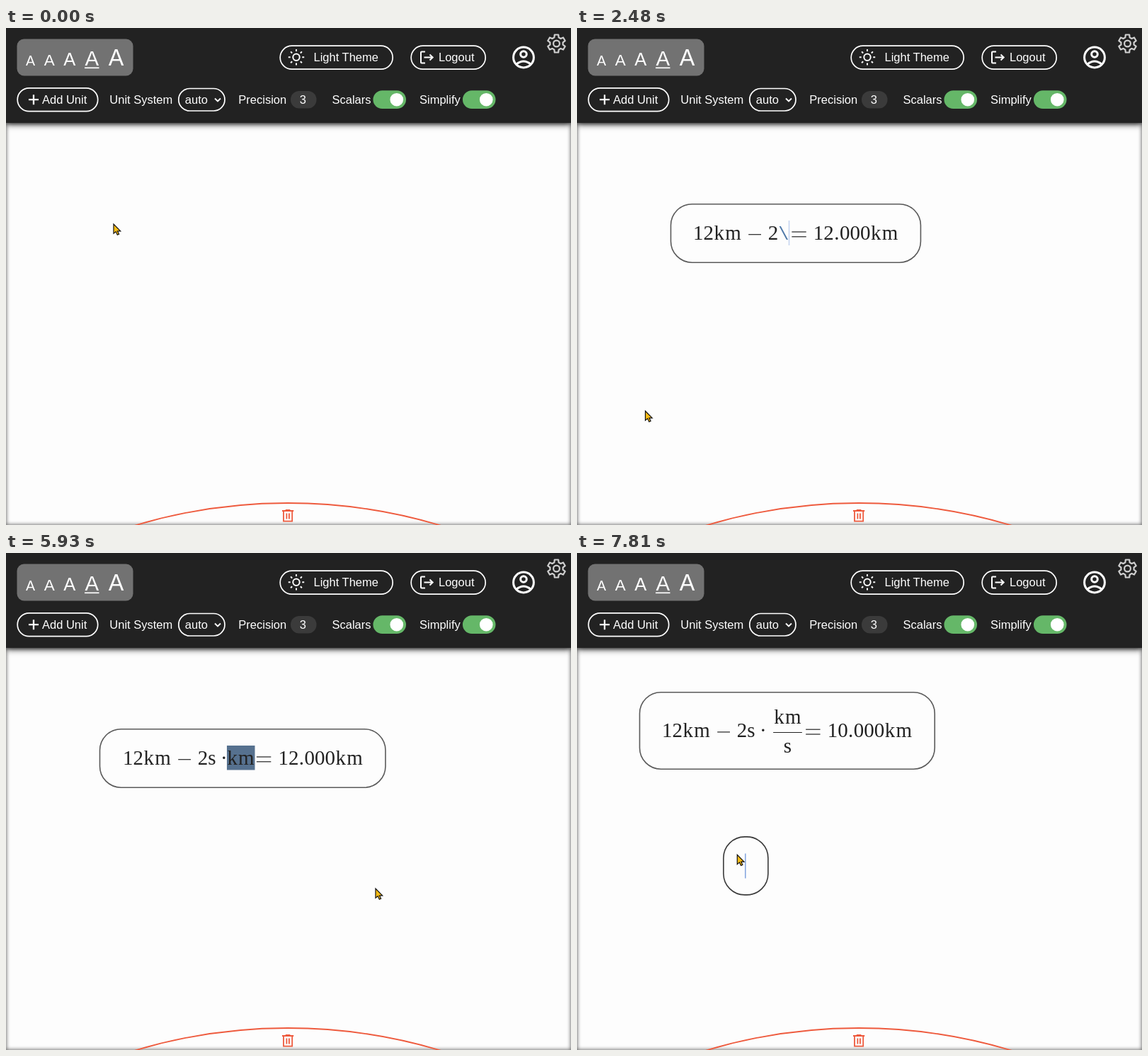
An HTML page that plays this animation: 798 by 702 pixels, repeating every 8 s.

```html
<!DOCTYPE html>
<html lang="en">
<head>
<meta charset="utf-8">
<title>Unit calculator</title>
<style>
html, body { margin: 0; width: 100%; height: 100%; overflow: hidden; background: #fdfdfd; }
#page, #head { position: absolute; left: 0; width: 798px; }
#page { top: 134px; height: 568px; box-shadow: inset 0 0 5px 1px #777; }
#head { top: 0; height: 134px; background: #222; box-shadow: 0 2px 9px rgba(0, 0, 0, .75); }
svg { position: absolute; left: 0; top: 0; display: block; }
text { font-family: "Liberation Sans", Arial, sans-serif; font-size: 16.5px; fill: #fff; white-space: pre; }
.line { fill: none; stroke: #fff; stroke-width: 1.7; }
.math text { font: 29px "Liberation Serif", serif; fill: #222; text-anchor: middle; }
.math text.tt { font: 25.4px "Liberation Mono", monospace; fill: #4f79a8; }
.math text.hint { opacity: .45; }
.math path { stroke: #222; stroke-width: 1.2; }
.box { fill: #fdfdfd; stroke-width: 1.6; }
.caret { fill: #6f97dc; }
.trash { fill: none; stroke: #ee5a3d; stroke-width: 1.8; }
</style>
</head>
<body>
<div id="page"></div>
<div id="head"></div>
<svg width="798" height="702" viewBox="0 0 798 702">
  <rect x="15.5" y="15.5" width="164" height="52" rx="10" fill="#727272"/>
  <g id="sizes"></g>
  <path class="line" d="M111 56.3H131.5"/>

  <g class="line">
    <rect x="387.2" y="25.2" width="159" height="33" rx="16.5"/>
    <rect x="572.2" y="25.2" width="105" height="33" rx="16.5"/>
    <rect x="16.2" y="84.8" width="113.5" height="32.8" rx="16.4"/>
    <rect x="243.8" y="85.5" width="65.2" height="31.5" rx="15.7"/>
    <circle cx="410" cy="41.3" r="4.7" stroke-width="2"/>
    <path id="rays" stroke-width="2"/>
    <path d="M592 33.5H587Q586 33.5 586 34.5V48.5Q586 49.5 587 49.5H592M590.5 41.5H602.5M598.5 37.5L602.7 41.5L598.5 45.5" stroke-width="2"/>
    <path d="M32 101.2H46M39 94.2V108.2" stroke-width="2.3"/>
    <path d="M295 99.5L299 103.5L303 99.5" stroke-width="1.9"/>
    <g stroke-width="3">
      <circle cx="731" cy="41.5" r="14.4"/>
      <circle cx="731" cy="37" r="4.3"/>
      <path d="M720.8 51.2Q731 42.8 741.2 51.2"/>
    </g>
    <g stroke="#d0d0d0" stroke-width="2.2" stroke-linejoin="round">
      <path id="gear"/>
      <circle cx="777.5" cy="22" r="4.4"/>
    </g>
  </g>
  <rect x="402" y="89" width="36.5" height="24.5" rx="12" fill="#3b3b3b"/>
  <g id="labels"></g>
  <g id="toggles"></g>

  <g id="bin" class="trash">
    <circle id="arc" cx="398" cy="1421" r="750"/>
    <path id="can" d="M390 682H406.2M394.8 680.8H401.4M392 682.5V696.7H404.2V682.5M396.4 685.5V693.5M399.9 685.5V693.5"/>
  </g>

  <g id="calc" class="math"></g>
  <g id="fresh" class="math"></g>
  <path id="mouse" d="M0 0V13.3L3.2 10.6L5.3 15.2L7.6 14.2L5.5 9.8H9.7Z" fill="#fbbd14" stroke="#111" stroke-width="1.2"/>
</svg>
<script>
const $ = id => document.getElementById(id);
const LOOP = 8000, EM = 29.04;

// Toolbar
$('sizes').innerHTML = [[28, 19.6], [53.8, 22.5], [81.2, 25.6], [111.4, 29.4], [144.7, 32.4]]
  .map(([x, size]) => `<text x="${x}" y="53" style="font-size:${size}px">A</text>`).join('');
$('labels').innerHTML = [
  [434.5, 47, 'Light Theme'], [611, 47, 'Logout'], [51, 107, 'Add Unit'],
  [146.3, 107, 'Unit System'], [252.8, 107, 'auto'], [328.3, 107, 'Precision'],
  [414.8, 107, '3'], [460.5, 107, 'Scalars'], [584, 107, 'Simplify']
].map(([x, y, s]) => `<text x="${x}" y="${y}">${s}</text>`).join('');
$('toggles').innerHTML = [518.5, 645].map(x =>
  `<rect x="${x}" y="88.3" width="46.5" height="25.8" rx="12.9" fill="#65b768"/>
   <circle cx="${x + 33.3}" cy="101.2" r="9.3" fill="#fff"/>`).join('');

const polar = (cx, cy, r, deg) => {
  const a = deg * Math.PI / 180;
  return `${cx + r * Math.cos(a)} ${cy + r * Math.sin(a)}`;
};
$('rays').setAttribute('d', [0, 45, 90, 135, 180, 225, 270, 315]
  .map(a => `M${polar(410, 41.3, 8.3, a)}L${polar(410, 41.3, 11.2, a)}`).join(''));
$('gear').setAttribute('d', 'M' + [-90, -30, 30, 90, 150, 210]
  .flatMap(a => [[9.2, -20], [12.8, -12], [12.8, 12], [9.2, 20]]
    .map(([r, d]) => polar(777.5, 22, r, a + d))).join('L') + 'Z');

// Typed states: "\" starts command mode, "|" a suggestion, "[" a selection, "/" a fraction
const KM = '12km−2', PROD = KM + 's·';
const STATES = [
  [60, '', ''], [890, '1', '1.000'], [1150, '12', '12.000'],
  [1400, '12\\', '12.000'], [1540, '12\\k|er', '12.000'], [1680, '12\\km', '12.000'],
  [1850, '12[km', '12.000km'], [2060, '12km', '12.000km'],
  [2200, '12km−', '12.000km'], [2340, KM, '12.000km'], [2480, KM + '\\', '12.000km'],
  [2620, KM + '\\s|in', '12.000km'], [2920, KM + '[s', '12.000km'], [3190, KM + 's', '12.000km'],
  [3700, PROD, '12.000km'], [4900, PROD + '\\', '12.000km'],
  [5060, PROD + '\\k|er', '12.000km'], [5220, PROD + '\\km', '12.000km'],
  [5510, PROD + '[km', '12.000km'],
  [6180, PROD + '/km/?', '12.000km'], [6460, PROD + '/km/s', '10.000km']
];
const ADVANCE = { k: .528, m: .833, s: .394, '−': .778, '·': .278, '.': .278, '=': .778 };
const advance = c => (ADVANCE[c] || .5) * EM;
const width = s => [...s].reduce((w, c) => w + advance(c), 0);
const glyph = (c, x, y, cls = '') => `<text class="${cls}" x="${x}" y="${y}">${c}</text>`;
const bar = (cx, y, half) => `<path d="M${cx - half} ${y}H${cx + half}"/>`;
const caret = (x, y, op) => `<rect class="caret" x="${x}" y="${y - 27}" width="1.6" height="35" opacity="${op}"/>`;

function run(s, x, y) {
  let out = '';
  for (const c of s) {
    const w = advance(c);
    out += glyph(c, x + w / 2, y);
    x += w;
  }
  return out;
}

function frame(x, y, w, h, dark) {
  return `<rect class="box" x="${x}" y="${y}" width="${w}" height="${h}" rx="30" stroke="${dark ? '#262626' : '#5a5a5a'}"/>`;
}

function expression(field, result, dark, focus) {
  const [line, num, den] = field.split('/');
  const open = den === '?';
  const y = num ? 312.2 : 299;
  let x = field.includes('[') ? 165 : 164;
  let out = '', mode = '', caretX = 0, caretY = y;
  [...line].forEach((c, i) => {
    if (c === '[') {
      const w = width(line.slice(i + 1));
      out += `<rect x="${x}" y="${y - 27}" width="${w}" height="34.5" fill="#56718f"/>`;
      mode = 'sel';
      return;
    }
    if (c === '|') { caretX = x; mode = 'tt hint'; return; }
    if (c === '\\') mode = 'tt';
    if (mode.startsWith('tt')) {
      out += glyph(c, x + .2625 * EM, y, mode);
      x += .525 * EM;
      return;
    }
    const w = advance(c), op = c === '−' || c === '·', next = line[i + 1];
    if (op) x += .25 * EM;
    out += c === '−' ? bar(x + w / 2, y - 7.3, 8.9) : glyph(c, x + w / 2, y);
    x += w;
    if (op && (next ? next !== '[' : num)) x += .25 * EM;
  });
  caretX = caretX || x - .7;
  if (num) {
    const w = width(num), mid = x + 3.5 + w / 2, dw = open ? 17 : width(den);
    out += run(num, x + 3.5, y - 19.5) + bar(mid, y - 6.7, w / 2 + .6);
    out += open
      ? `<rect x="${mid - 10}" y="${y + 3}" width="20" height="28" fill="#56718f"/>
         <rect x="${mid - 6}" y="${y + 10}" width="12" height="14" fill="none" stroke="#222"/>`
      : run(den, mid - dw / 2, y + 21.5);
    caretX = mid + dw / 2;
    caretY = y + 21.5;
    x += w + 7;
  }
  if (focus && mode !== 'sel' && !open)
    out += caret(caretX, caretY, result ? .38 : .9);
  if (result) {
    x += mode.startsWith('tt') ? 2.8 : 1.3;
    const mid = x + advance('=') / 2;
    out += bar(mid, y - 4.2, 10.2) + bar(mid, y - 11, 10.2);
    x += advance('=') + 9;
    out += run(result, x, y);
    x += width(result);
  }
  const h = open ? 115 : num ? 108.5 : 82.5;
  return frame(132.5, 248.7, x + 31.4 - 132.5, h, dark) + out;
}

$('fresh').innerHTML = frame(206.9, 400.9, 63, 82, true) + caret(237, 451.5, .9);

// Motion: [time, x, y]
const MOUSE = [
  [300, 152, 277], [750, 96.5, 541], [3440, 96.5, 541], [4350, 522, 474],
  [6600, 522, 474], [6880, 508, 343.3], [6960, 508, 343.3], [7380, 471.7, 300],
  [7480, 464.5, 291.5], [7540, 464.5, 291.5], [7730, 226.3, 426.3]
];
const DRAG = [[6960, 0, 0], [7380, -36.5, -43.3], [7480, -44, -52]];
const RISE = [[6940, 0, 0], [7080, 15, 5], [7220, 14, 4.7], [7380, 6, 2], [7550, 2.4, .8], [7720, 0, 0]];

function at(keys, t) {
  const i = keys.findIndex(k => k[0] > t);
  if (i === 0) return keys[0].slice(1);
  if (i < 0) return keys[keys.length - 1].slice(1);
  const a = keys[i - 1], b = keys[i];
  const u = (t - a[0]) / (b[0] - a[0]), e = u * u * (3 - 2 * u);
  return [a[1] + (b[1] - a[1]) * e, a[2] + (b[2] - a[2]) * e];
}
const move = (id, x, y) => $(id).setAttribute('transform', `translate(${x} ${y})`);
const fade = (id, t, start, ms) =>
  $(id).setAttribute('opacity', Math.max(0, Math.min(1, (t - start) / ms)));

let shown = '';
function draw(now) {
  const t = now % LOOP;
  const state = STATES.filter(s => s[0] <= t).pop();
  const dark = t < 420 || (t > 6850 && t < 7580);
  const focus = t < 6880;
  const key = state ? [state[0], dark, focus].join() : '';
  if (key !== shown) {
    shown = key;
    $('calc').innerHTML = state ? expression(state[1], state[2], dark, focus) : '';
  }
  const [up, canUp] = at(RISE, t);
  move('mouse', ...at(MOUSE, t));
  move('calc', ...at(DRAG, t));
  move('arc', 0, -up);
  move('can', 0, -canUp);
  fade('calc', t, 40, 160);
  fade('fresh', t, 7730, 90);
  requestAnimationFrame(tick);
}
const tick = () => draw(performance.now());
tick();
</script>
</body>
</html>
```
